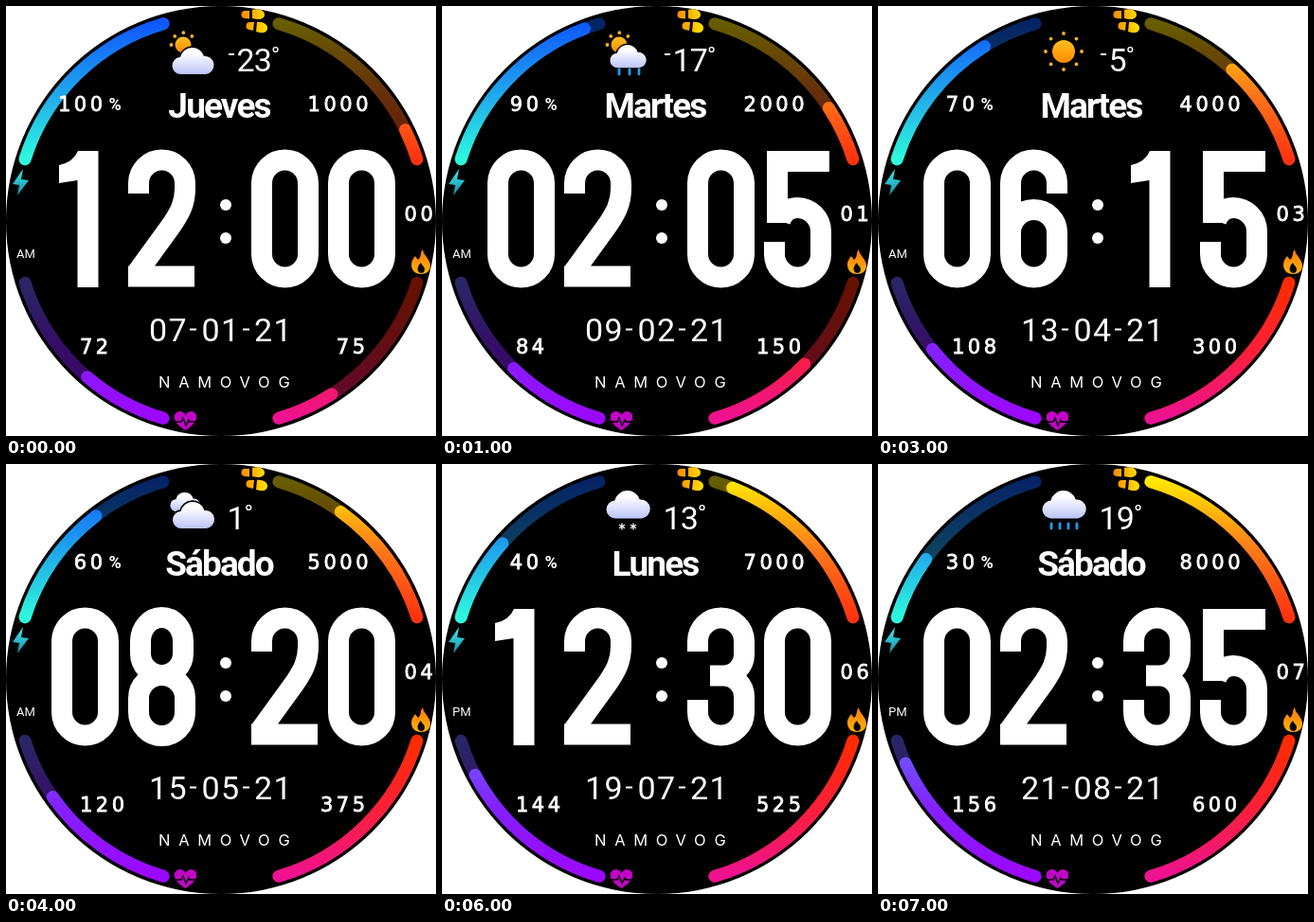
Write an HTML page that moves like this. It is 454 by 454 pixels and loops after 8 s.

```html
<!DOCTYPE html>
<html lang="es">
<meta charset="utf-8">
<title>Watch face</title>
<style>
  html, body { margin: 0; width: 100%; height: 100%; overflow: hidden; background: #fff }
  svg { display: block; width: 454px; height: 454px }
  text { fill: #fff; font: 34px Roboto, sans-serif }
  .small { font: 21px "DejaVu Sans", sans-serif; letter-spacing: 3.5px; stroke: #fff; stroke-width: .8px }
  .end { text-anchor: end }
  .date { letter-spacing: 1.4px }
  #temp { letter-spacing: -.8px }
  #day { font-size: 37px; font-weight: 700; letter-spacing: -1.9px; text-anchor: middle }
  #percent { font-size: 18px; font-weight: 700 }
  #half { font-size: 13px }
  #brand { font: 16.5px Inter, sans-serif; letter-spacing: 8.7px }
  #gauges path { fill: none; stroke-width: 13; stroke-linecap: round }
  .stroke { fill: none; stroke: #fff; stroke-width: 22 }
  .sun { fill: url(#sunny) }
  .rays { fill: none; stroke: #ffb21a; stroke-width: 3.8; stroke-linecap: round; stroke-dasharray: 0 1 }
  .cloud { fill: url(#sky); stroke: #000; stroke-width: 3.5; paint-order: stroke }
  .rain { stroke: #1f9bf5; stroke-width: 2.8; stroke-linecap: round }
  .flake { stroke: #fff; stroke-width: 1.3 }
</style>
<svg viewBox="0 0 454 454">
  <defs id="defs">
    <linearGradient id="sky" x2="0" y2="1"><stop offset=".2" stop-color="#fff"/><stop offset="1" stop-color="#bcc4f8"/></linearGradient>
    <linearGradient id="sunny" x2="0" y2="1"><stop stop-color="#ffc021"/><stop offset="1" stop-color="#ff8a00"/></linearGradient>
    <linearGradient id="fire" x2="0" y2="1"><stop stop-color="#ff7a10"/><stop offset="1" stop-color="#ffb400"/></linearGradient>
    <linearGradient id="spark" x2="0" y2="1"><stop stop-color="#3cecf0"/><stop offset="1" stop-color="#1a8aa4"/></linearGradient>
    <linearGradient id="feet" gradientUnits="userSpaceOnUse" x1="249" x2="275"><stop stop-color="#ff8a00"/><stop offset="1" stop-color="#ffe000"/></linearGradient>
  </defs>
  <circle cx="227" cy="227" r="227"/>
  <g id="gauges"></g>

  <g fill="url(#feet)">
    <path d="M257 5h-4a4 4 0 0 0-1 8l5 .5zM260 4c5-2 13 0 13 5s-6 6-13 4z"/>
    <path d="M262 17h-4a4 4 0 0 0-1 8l4 1zM265 17c5-1 12 2 11 7s-6 5-12 3z"/>
  </g>
  <path fill="url(#spark)" d="M18 172L7 188l7 1-2 11 12-16-8-1z"/>
  <path fill="url(#fire)" d="M440 257c1 7 8 10 8 17 0 6-4 9-10 9s-10-4-10-10c0-4 2-6 4-9l3 4c4-3 2-8 5-11z"/>
  <path d="M438 282c-4-1-5-6 0-11 1 3 4 4 4 7s-2 4-4 4z"/>
  <path fill="#c204c8" d="M189.500 448c-15-9-14-19-6-20 3 0 5 2 6 4 1-2 3-4 6-4 8 1 9 11-6 20z"/>
  <path fill="none" stroke="#000" stroke-width="1.500" d="M178 439h7l2-4 3 8 3-6 1 2h7"/>

  <g id="weather"></g>
  <path id="minus" stroke="#fff" stroke-width="2" d="M235 51h6"/>
  <text id="temp" y="68.500"></text>
  <circle id="degree" cy="46" r="2.400" fill="none" stroke="#fff" stroke-width="1.400"/>
  <text id="day" x="225" y="117.500"></text>

  <text id="battery" class="small end" x="105.500" y="110.500"></text>
  <text id="percent" x="108.500" y="110">%</text>
  <text id="steps" class="small end" x="386" y="110.500"></text>
  <text id="sec" class="small" x="420.600" y="226.500"></text>
  <text id="half" x="11" y="265.500"></text>
  <text id="heart" class="small" x="78" y="366.500"></text>
  <text id="burn" class="small end" x="382.500" y="366.500"></text>

  <g id="clock"></g>
  <g fill="#fff"><circle cx="232" cy="210" r="6"/><circle cx="232" cy="245" r="6"/></g>
  <text id="date" class="date" x="151" y="354"></text>
  <text id="month" class="date" x="206.500" y="354"></text>
  <text class="date" x="262" y="354">21</text>
  <path stroke="#fff" stroke-width="2" d="M194 341.500h7M250 341.500h7"/>
  <text id="brand" x="161" y="403">NAMOVOG</text>
</svg>
<script>
const $ = id => document.getElementById(id);
const pad = n => String(n).padStart(2, '0');
const LOW = 17.5, HIGH = 73.7, SPAN = HIGH - LOW;
const DAYS = ['Jueves', 'Martes', 'Jueves', 'Martes', 'Sábado', 'Jueves', 'Lunes', 'Sábado'];

// Side signs, colours from start to end, and filled degrees per step
const GAUGES = [
  { sx: -1, sy: -1, colors: ['#2ff8dc', '#20a4ec', '#0f58ff'], fill: i => (1 - i / 10) * SPAN + 1.3 },
  { sx: 1, sy: -1, colors: ['#ff3210', '#ff7a1a', '#ffe800'], fill: i => (i + 1) / 8 * SPAN + 1.8 },
  { sx: -1, sy: 1, colors: ['#9c08ff', '#8420ff', '#6a60ff'], fill: i => (72 + 12 * i) * .3 + 2.7 },
  { sx: 1, sy: 1, colors: ['#ee1290', '#fa2038', '#ff2c00'], fill: i => 3 + 13.3 * (i + 1) }
];

function arc({ sx, sy }, degrees) {
  const point = a => {
    const r = a * Math.PI / 180;
    return `${227 + sx * 217 * Math.cos(r)} ${227 + sy * 217 * Math.sin(r)}`;
  };
  const span = Math.min(degrees, SPAN);
  const [from, to] = sy < 0 ? [LOW, LOW + span] : [HIGH, HIGH - span];
  return `M${point(from)}A217 217 0 0 ${sx < 0 ? 1 : 0} ${point(to)}`;
}

GAUGES.forEach((g, n) => {
  const [y1, y2] = g.sy < 0 ? [162, 18] : [435, 292];
  const stops = g.colors.map((c, k) => `<stop offset="${k / 2}" stop-color="${c}"/>`).join('');
  $('defs').innerHTML += `<linearGradient id="g${n}" gradientUnits="userSpaceOnUse" x1="0" x2="0" y1="${y1}" y2="${y2}">${stops}</linearGradient>`;
  $('gauges').innerHTML += `<path stroke="url(#g${n})" opacity=".4" d="${arc(g, SPAN)}"/><path id="bar${n}" stroke="url(#g${n})"/>`;
});

// Large digits: stroked path, then optional filled path
const DIGITS = {
  0: ['M11 36a24.5 24.5 0 0 1 49 0V111a24.5 24.5 0 0 1-49 0Z'],
  1: ['', 'M49.5 146H27.500V33L8 36V17Q23 14 28 2H49.500Z'],
  2: ['M11 47V36a24.5 24.5 0 0 1 49 0V42c0 16-6 26-14 38L9 131M0 134.500H70'],
  3: ['M11 47V36a24.5 24.5 0 0 1 49 0V50a22 22.5 0 0 1-22 22.500H24M38 72.500a22 22 0 0 1 22 22V111a24.5 24.5 0 0 1-49 0V98'],
  4: ['M0 116H72M50.500 2V146', 'M37 2H55L23 106H0V98Z'],
  5: ['M69 13H14V78M17 76c3-9 9-14 18-14a25 25 0 0 1 25 25V111a24.5 24.5 0 0 1-49 0V98'],
  6: ['M60 47V36a24.5 24.5 0 0 0-49 0V111a24.5 24.5 0 0 0 49 0V88a24.5 24 0 0 0-49 0'],
  8: ['M13 36a22.5 25 0 0 1 45 0V49a22.5 23 0 0 1-45 0ZM11 96a24.5 24 0 0 1 49 0V111a24.5 25 0 0 1-49 0Z']
};
const digit = (d, x) => {
  const [line, area = ''] = DIGITS[d];
  return `<g transform="translate(${x} 151)"><path class="stroke" d="${line}"/><path fill="#fff" d="${area}"/></g>`;
};

const cloud = (x, y, scale = 1) =>
  `<path class="cloud" transform="translate(${x} ${y}) scale(${scale})" d="M10 28a9 9 0 0 1-1-18a13 13 0 0 1 25-1a9.5 9.5 0 0 1 2 19z"/>`;
const rain = (y, ...xs) => `<path class="rain" d="${xs.map(x => `M${x} ${y}v5`).join('')}"/>`;
const flake = (x, y) => `<path class="flake" d="M${x} ${y - 3.5}v7M${x - 3} ${y - 1.7}l6 3.4M${x - 3} ${y + 1.7}l6-3.4"/>`;
const sun = '<circle class="sun" cx="187" cy="41" r="8.500"/><path class="rays" pathLength="4" d="M174.500 41a12.800 12.800 0 0 1 25.600 0"/>';
const shower = sun + cloud(177, 41, .87);
const bigCloud = cloud(173, 28, 1.05);
const WEATHER = [
  sun + cloud(175, 44),
  shower + rain(67, 187, 198, 208),
  shower + flake(196.5, 70),
  '<circle class="sun" cx="196" cy="48" r="12"/><circle class="rays" pathLength="8" cx="196" cy="48" r="19"/>',
  cloud(173, 30, .72) + cloud(175.5, 40),
  bigCloud + rain(63, 191, 201),
  bigCloud + flake(190, 66) + flake(202, 66),
  bigCloud + rain(63, 183, 192, 201, 210)
];

function show(i) {
  const hour = (2 * i + 11) % 12 + 1, temp = 6 * i - 23;
  const values = {
    battery: 100 - 10 * i, steps: 1000 * (i + 1), heart: 72 + 12 * i, burn: 75 * (i + 1),
    sec: pad(i), half: i < 6 ? 'AM' : 'PM', day: DAYS[i],
    date: pad(7 + 2 * i), month: pad(i + 1), temp: Math.abs(temp)
  };
  for (const id in values) $(id).textContent = values[id];

  const left = temp < 0 ? 243.5 : 233.5;
  $('minus').style.display = temp < 0 ? '' : 'none';
  $('temp').setAttribute('x', left);
  $('degree').setAttribute('cx', left + 18.3 * String(values.temp).length + 4.5);

  $('weather').innerHTML = WEATHER[i];
  $('clock').innerHTML = [...pad(hour) + pad(5 * i)].map((d, k) => digit(d, [48, 129, 259, 340][k])).join('');
  GAUGES.forEach((g, n) => $('bar' + n).setAttribute('d', arc(g, g.fill(i))));
}

let shown = -1;
function tick() {
  const i = Math.floor(performance.now() / 1000) % 8;
  if (i !== shown) show(shown = i);
  requestAnimationFrame(tick);
}
tick();
</script>
</html>
```
